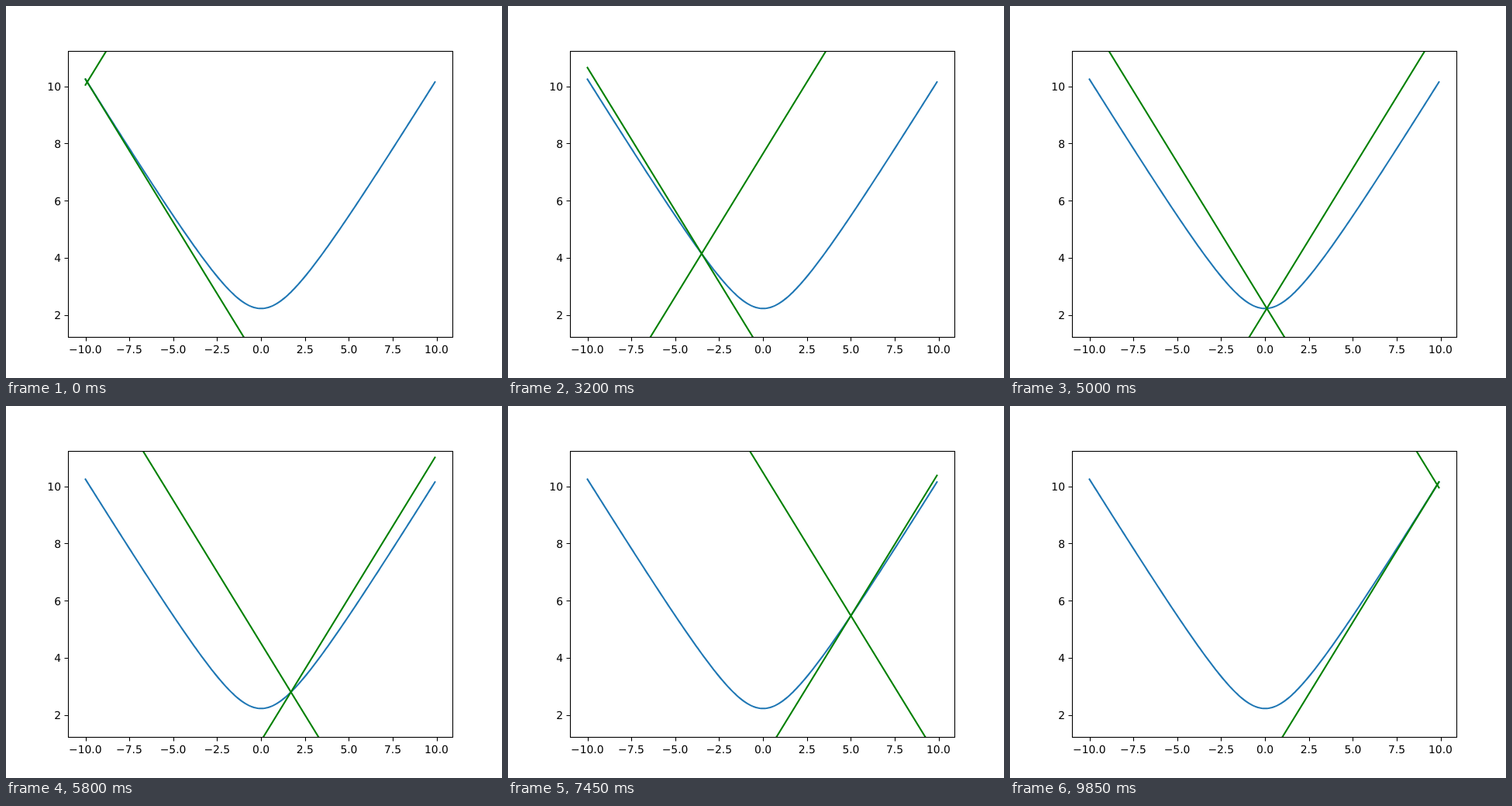
Write an HTML page that moves like this. It is 640 px wide and 480 px high and loops after 9.9 s.

```html
<!DOCTYPE html>
<html lang="en">
<head>
<meta charset="utf-8">
<title>Lines through a curve</title>
<style>
  html, body { margin: 0; width: 100%; height: 100%; overflow: hidden; background: #fff; }
  svg { display: block; width: 640px; height: 480px; }
  text { font: 13.889px "DejaVu Sans", sans-serif; text-rendering: geometricPrecision; }
  .plot { fill: none; stroke-width: 2.083; stroke-linecap: square; stroke-linejoin: round; }
  .axis { fill: none; stroke: #000; stroke-width: 1.111; }
</style>
</head>
<body>
<svg id="stage" viewBox="0 0 640 480">
  <clipPath id="area"><rect x="80" y="58" width="496" height="369"/></clipPath>
  <g class="plot" clip-path="url(#area)">
    <path id="curve" stroke="#1f77b4"/>
    <path id="rising" stroke="#008000"/>
    <path id="falling" stroke="#008000"/>
  </g>
  <path id="ticks" class="axis"/>
  <rect class="axis" x="80.5" y="58.5" width="496" height="369"/>
  <g id="labels"></g>
</svg>
<script>
const STEP = 50, STEPS = 198;
const X0 = -10, X1 = 9.9;
const f = x => Math.sqrt(x * x + 5);

// Data limits: 5% margin across, one unit above and below.
const pad = (X1 - X0) * 0.05;
const yMin = f(0) - 1, yMax = f(X0) + 1;
const px = x => 80 + (x - X0 + pad) * 496 / (X1 - X0 + 2 * pad);
const py = y => 427.2 - (y - yMin) * 369.6 / (yMax - yMin);

const $ = id => document.getElementById(id);
const point = (x, y) => px(x).toFixed(3) + "," + py(y).toFixed(3);
const setPath = (id, d) => $(id).setAttribute("d", d);

function addLabel(str, x, y, anchor) {
  const el = document.createElementNS("http://www.w3.org/2000/svg", "text");
  el.setAttribute("x", x);
  el.setAttribute("y", y);
  el.setAttribute("text-anchor", anchor);
  el.textContent = str;
  $("labels").append(el);
}

function drawAxes() {
  let d = "";
  for (let v = -10; v <= 10; v += 2.5) {
    const str = v.toFixed(1).replace("-", "\u2212");
    const nudge = v < 0 || v === 10 ? -0.25 : 0;
    d += `M${Math.round(px(v)) + 0.5} 427.5v5`;
    addLabel(str, px(v) + nudge, 448, "middle");
  }
  for (let v = 2; v <= 10; v += 2) {
    d += `M80.5 ${Math.round(py(v)) + 0.5}h-5`;
    addLabel(v, 71, Math.round(py(v) + 5.3), "end");
  }
  setPath("ticks", d);
}

function drawCurve() {
  const pts = Array.from({ length: 200 }, (_, i) => {
    const x = X0 + i / 10;
    return point(x, f(x));
  });
  setPath("curve", "M" + pts.join("L"));
}

function drawLine(id, a, slope) {
  const y = x => f(a) + slope * (x - a);
  setPath(id, `M${point(X0, y(X0))}L${point(X1, y(X1))}`);
}

let last = -1;
function render(t) {
  const n = Math.floor(t / STEP) % STEPS;
  if (n === last) return;
  last = n;
  const a = (n - 99) / 10;
  drawLine("rising", a, 1);
  drawLine("falling", a, -1);
}

drawAxes();
drawCurve();
render(0);
const start = performance.now();
(function loop() {
  render(performance.now() - start);
  requestAnimationFrame(loop);
})();
</script>
</body>
</html>
```
